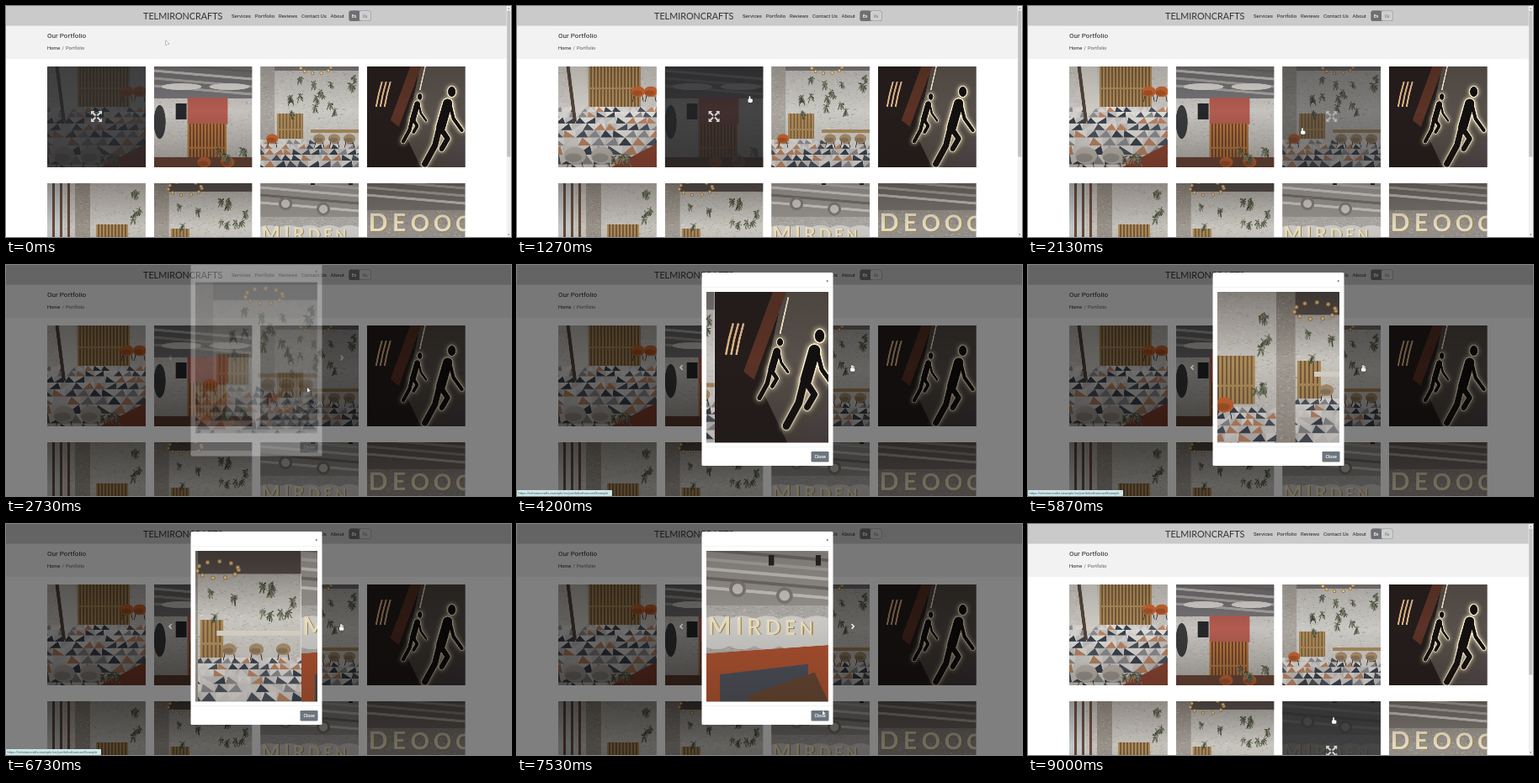
Write an HTML page with a canvas that moves like this. It is 600 by 275 pixels and loops after 9270 ms.

```html
<!DOCTYPE html>
<html lang="en">
<head>
<meta charset="utf-8">
<title>Our Portfolio</title>
<style>
html, body { margin: 0; width: 100%; height: 100%; overflow: hidden; background: #fff; }
canvas { display: block; width: 100vw; height: 100vh; }
</style>
</head>
<body>
<canvas id="stage"></canvas>
<script>
const W = 600, H = 275, LOOP = 9270;
const K = Math.max(1, window.devicePixelRatio || 1);
const PHOTO_W = 117, PHOTO_H = 144;
let g; // context currently drawn on

function surface(canvas, w, h, scale) {
  canvas.width = Math.round(w * scale);
  canvas.height = Math.round(h * scale);
  const c = canvas.getContext('2d');
  c.scale(scale, scale);
  return c;
}

// --- drawing helpers ---
function rect(color, x, y, w, h, r = 0) {
  g.fillStyle = color;
  g.beginPath();
  g.roundRect(x, y, w, h, r);
  g.fill();
}
function trace(pts) {
  g.beginPath();
  for (let i = 0; i < pts.length; i += 2) g.lineTo(pts[i], pts[i + 1]);
}
function poly(color, ...pts) {
  trace(pts);
  g.fillStyle = color;
  g.fill();
}
function line(color, width, ...pts) {
  trace(pts);
  g.strokeStyle = color;
  g.lineWidth = width;
  g.stroke();
}
function oval(color, x, y, rx, ry = rx) {
  g.fillStyle = color;
  g.beginPath();
  g.ellipse(x, y, rx, ry, 0, 0, 7);
  g.fill();
}
function text(str, x, y, size, color = '#222', font = 'Roboto', weight = 400) {
  g.font = `${weight} ${size}px ${font}, sans-serif`;
  g.fillStyle = color;
  g.fillText(str, x, y);
  return g.measureText(str).width;
}
function faded(alpha, draw) {
  if (alpha <= 0) return;
  g.save();
  g.globalAlpha = alpha;
  draw();
  g.restore();
}
function clipped(x, y, w, h, draw) {
  g.save();
  g.beginPath();
  g.rect(x, y, w, h);
  g.clip();
  draw();
  g.restore();
}

// --- things seen in the photographs ---
let seed = 7;
const rnd = (lo = 0, hi = 1) => lo + (hi - lo) * (seed = seed * 16807 % 2147483647) / 2147483647;
const pick = list => list[Math.floor(rnd(0, list.length))];

function wall(color, x = 0, w = PHOTO_W) {
  rect(color, x, 0, w, PHOTO_H);
  for (let i = w * 9; i > 0; i--)
    rect(pick(['#ffffff38', '#0000001c']), x + rnd(0, w - 2), rnd(0, PHOTO_H), 2, .8);
}
function shade(top, bottom) {
  const fill = g.createLinearGradient(0, 0, 0, PHOTO_H);
  fill.addColorStop(0, `rgba(30,24,20,${top})`);
  fill.addColorStop(.45, 'rgba(30,24,20,0)');
  fill.addColorStop(1, `rgba(30,24,20,${bottom})`);
  rect(fill, 0, 0, PHOTO_W, PHOTO_H);
}
function mosaic(top, size) {
  for (let y = top, s = size; y < PHOTO_H; y += s * .6, s *= 1.1)
    for (let x = -rnd(0, s); x < PHOTO_W; x += s) {
      const b = y + s * .6;
      rect(pick(['#dfdcd7', '#cfccc9', '#c3c0bd']), x, y, s, s * .6);
      poly(pick(['#39414d', '#4b525d', '#8b8b8e', '#d5d2cf', '#b98464']), x, b, x + s * rnd(), y, x + s, b);
    }
}
function slats(x, y, w, h, color = '#ab8a58', gap = '#75593a') {
  rect(gap, x, y, w, h);
  for (let i = 0; i < w; i += 4) rect(color, x + i, y, 2.4, h);
  rect(color, x, y + h * .6, w, 2);
}
function plants(count, x, y, w, h) {
  while (count--) {
    const px = x + rnd(0, w), py = y + rnd(0, h);
    for (let i = 0; i < 22; i++)
      line(pick(['#5b6350', '#747a62', '#434a3a', '#8d8f7c']), .9, px, py, px + rnd(-4, 4), py + rnd(-3, 9));
  }
}
function chairs(color, size, x, y, count = 1, step = 0) {
  for (; count--; x += step) {
    for (const side of [-1, 1]) line('#3a2e28', .8, x + side * size * .5, y, x + side * size * .8, y + size * 1.5);
    oval(color, x, y, size, size * .8);
    oval('#0000002a', x - size * .15, y + size * .2, size * .75, size * .4);
  }
}
function lamps(x, y, r) {
  for (let a = 0; a < 6.2; a += .6) {
    const bx = x + r * Math.cos(a), by = y + r * .4 * Math.sin(a);
    oval('#c08a45', bx, by, 2.2);
    oval('#ffedb8', bx, by, 1.3);
  }
}
function ceiling(depth, color) {
  rect(color, 0, 0, PHOTO_W, depth);
  for (let y = -10; y < depth - 12; y += 9)
    line(pick(['#c3bfba', '#6d6964', '#aaa6a1']), 3, 0, y, PHOTO_W, y + 10);
}
function sign(word, x, base, size, shrink) {
  for (const letter of word) {
    text(letter, x + 1, base + .5, size, '#a1843f', 'Lato', 700);
    x += text(letter, x, base, size, '#e6dcc3', 'Lato', 700) + size * .18;
    size *= shrink;
  }
}
// Leaning walker, drawn from its head downwards, lit from behind.
function walker(x, y, s) {
  g.save();
  g.translate(x, y);
  g.scale(s, s);
  g.lineCap = g.lineJoin = 'round';
  g.shadowColor = '#fff0c4';
  for (const [color, grow, blur] of [['#fff4d6', 2.5, 14 * K], ['#120f0f', 0, 0]]) {
    g.shadowBlur = blur;
    oval(color, 0, 0, 4.5 + grow / 2, 6 + grow / 2);
    line(color, 11 + grow, -5, 14, -13, 42);
    line(color, 7 + grow, -15, 44, -20, 64, -32, 86);
    line(color, 6 + grow, -13, 44, -5, 56, -12, 68);
    line(color, 4 + grow, -2, 16, 2, 32, 12, 46);
  }
  g.restore();
}

const ORANGE = '#c4622f', BEIGE = '#a68d6c', BRICK = '#c6c3be', DARK = '#5b5450';
const scenes = [
  () => {
    wall(BRICK);
    slats(36, 0, 62, 62);
    mosaic(60, 10);
    poly('#cfccc6', 14, 0, 32, 0, 36, 58, 20, 74);
    line('#51433a', 4, 10, 0, 20, 78);
    chairs(ORANGE, 8, 95, 42, 2, 15);
    poly('#8a4330', 117, 104, 117, 144, 40, 144);
    chairs('#bcb5ad', 13, 20, 118, 2, 32);
    plants(5, 62, 112, 24, 12);
    shade(.2, .3);
  },
  () => {
    wall(BRICK);
    ceiling(50, '#747376');
    for (const x of [33, 90]) oval('#d9d7d3', x, 36, 24, 4);
    rect('#b25c50', 40, 49, 48, 32);
    slats(40, 80, 46, 46, '#b07a3f', '#6e3426');
    oval('#383a3c', 7, 78, 7, 20);
    rect('#26272a', 26, 56, 13, 19);
    rect('#6b4635', 0, 120, 117, 24);
    chairs(ORANGE, 8, 60, 126, 2, 28);
    plants(6, 76, 108, 36, 14);
    shade(.3, .4);
  },
  () => {
    wall('#cac8c3');
    rect('#7d7a7b', 0, 0, 117, 17);
    wall('#aaa69f', 0, 17);
    mosaic(99, 9);
    slats(20, 68, 31, 30);
    plants(16, 34, 20, 78, 48);
    lamps(66, 13, 18);
    rect('#a5875c', 60, 87, 57, 4);
    chairs(ORANGE, 7, 14, 98);
    chairs(BEIGE, 7, 70, 98, 3, 18);
    shade(.25, .2);
  },
  () => {
    rect('#241d1c', 0, 0, 117, 144);
    poly('#58504b', 66, 0, 117, 0, 117, 144, 70, 144, 46, 94);
    poly('#5a5054', 117, 94, 117, 144, 80, 144);
    poly('#5c3326', 56, 0, 69, 0, 38, 84, 28, 76);
    line('#fff3d0', 1.5, 71, 5, 63, 40);
    for (let x = 14; x < 28; x += 5) line('#e5b988', 2, x + 4, 30, x, 45, x - 3, 60);
    walker(63, 48, .62);
    walker(101, 42, 1);
    shade(.2, .4);
  },
  () => {
    wall('#c4c0ba');
    rect('#c3c8c8', 0, 0, 20, 144);
    for (let x = 6; x < 30; x += 9) rect('#67493a', x, 0, 3, 144);
    wall('#99938a', 33, 18);
    mosaic(110, 9);
    slats(58, 61, 38, 46);
    plants(5, 100, 12, 12, 45);
    plants(4, 96, 84, 12, 10);
    chairs(ORANGE, 9, 67, 108);
    shade(.4, .2);
  },
  () => {
    wall('#c8c5bf');
    rect(DARK, 0, 0, 117, 22);
    mosaic(102, 9);
    slats(20, 66, 22, 36);
    wall('#a19b93', 0, 18);
    plants(12, 26, 30, 84, 32);
    lamps(37, 18, 20);
    rect('#d7d1c6', 36, 76, 81, 5);
    chairs(BEIGE, 7, 48, 94, 3, 26);
    shade(.5, .2);
  },
  () => {
    wall('#aaa7a3');
    ceiling(52, '#928f8b');
    for (const x of [30, 75]) {
      oval('#7b7771', x, 32 + x / 7, 8);
      oval('#c2beb7', x, 32 + x / 7, 5);
      rect('#222', x + 30, 4, 5, 10);
    }
    for (let x = 10; x < 117; x += 24) oval('#cbc9c5', x, 78, 20, 16);
    sign('MIRDEN', 1, 80, 24, .94);
    poly('#a54e2d', 0, 98, 117, 90, 117, 144, 0, 144);
    poly('#484b54', 13, 118, 98, 108, 98, 144, 13, 144);
    poly('#61432f', 40, 138, 104, 116, 117, 144, 40, 144);
    shade(.2, .2);
  },
  () => {
    wall('#96908a');
    ceiling(44, '#77716b');
    sign('DEOOC', 2, 69, 30, .96);
    rect('#494b53', 0, 100, 117, 44);
    shade(.4, .2);
  }
];
const photos = scenes.map(draw => {
  const canvas = document.createElement('canvas');
  g = surface(canvas, PHOTO_W, PHOTO_H, 2.5 * K);
  draw();
  return canvas;
});

// --- timing ---
const mix = (a, b, p) => a + (b - a) * p;
const ramp = (t, from, to) => Math.min(1, Math.max(0, (t - from) / (to - from)));
const pulse = (t, on, off, fade) => ramp(t, on, on + fade) - ramp(t, off, off + fade);
const smooth = p => p * p * (3 - 2 * p);
const easeOut = p => 1 - (1 - p) ** 2;
const slideEase = p => 1 - (1 - p) ** 2.1 * (1 + .1 * p);

const CLICK = 2500, OPEN = 2685, SHUT = 7650;
const slideStarts = [3760, 4600, 5690, 6690];
const hovers = [
  { photo: 0, on: -500, off: 100 },
  { photo: 1, on: 750, off: 1400 },
  { photo: 2, on: 1850, off: 2400 },
  { photo: 6, on: 8350, off: LOOP }
];
const moves = [
  { from: 70, to: 2100, x: 326, y: 145 },
  { from: 2200, to: CLICK, x: 358, y: 146 },
  { from: 2950, to: 3500, x: 398, y: 119 },
  { from: 7050, to: 7480, x: 363, y: 222 },
  { from: 8100, to: 8500, x: 363, y: 230 }
];
function pointer(t) {
  let x = 190, y = 41;
  for (const move of moves) {
    const p = smooth(ramp(t, move.from, move.to));
    x = mix(x, move.x, p);
    y = mix(y, move.y, p);
  }
  return [x, y];
}

// --- page ---
function expandIcon(x, y) {
  for (let i = 0; i < 4; i++) {
    g.save();
    g.translate(x, y);
    g.rotate(i * Math.PI / 2);
    line('#d6d6d6', 2, 1, 1, 5, 5);
    poly('#d6d6d6', 6.5, 6.5, 2, 6.5, 6.5, 2);
    g.restore();
  }
}
function thumb(i, t) {
  const x = 49 + i % 4 * 126.6, y = i < 4 ? 72 : 211;
  const hover = hovers.find(h => h.photo === i);
  clipped(x, y, PHOTO_W, 120, () => {
    g.drawImage(photos[i], x, y - 12, PHOTO_W, PHOTO_H);
    if (hover) faded(pulse(t, hover.on, hover.off, 480), () => {
      rect('rgba(34,34,36,.78)', x, y, PHOTO_W, 120);
      expandIcon(x + 58.5, y + 59.5);
    });
  });
}
function header() {
  rect('#f2f2f2', 0, 23, W, 40);
  rect('#cacaca', 0, 0, W, 23.5);
  text('TELMIRONCRAFTS', 163, 16, 10.8, '#333', 'Lato');
  let x = 268;
  for (const label of ['Services', 'Portfolio', 'Reviews', 'Contact Us', 'About'])
    x += text(label, x, 14.4, 6.1) + 4.7;
  rect('#8a8c8f', 407.5, 5.5, 26, 12.5, 2.5);
  rect('#cfcfcf', 420, 6, 13, 11.5, 2);
  rect('#6c6f73', 407.5, 5.5, 12.5, 12.5, 2.5);
  text('En', 411, 13.5, 4.6, '#fff', 'Roboto', 700);
  text('Ru', 424, 13.5, 4.6, '#777');
  text('Our Portfolio', 49, 37.6, 8.1);
  text('Home', 49, 51.8, 5.7);
  text('/', 66.5, 51.8, 5.7, '#666');
  text('Portfolio', 71, 51.8, 5.8, '#566069');
}
function scrollbar() {
  rect('#f1f1f1', 594.7, 0, 5.3, H);
  rect('#c1c1c1', 595.3, 5.5, 4, 174);
  poly('#777', 596, 3.5, 598.6, 3.5, 597.3, 2);
  poly('#777', 596, 271.5, 598.6, 271.5, 597.3, 273);
}

// --- dialog with sliding photos ---
const layer = document.createElement('canvas');
const layerCtx = surface(layer, W, H, K);

function chevron(x, dir, color) {
  line(color, 1.5, x - dir * 1.4, 119.3, x + dir * 1.3, 122, x - dir * 1.4, 124.7);
}
function dialog(t) {
  rect('#fff', 219.5, 9, 156, 230, 1.5);
  for (const y of [26, 216.5]) rect('#e6e8ea', 220, y, 155, .5);
  text('×', 367.6, 20.5, 4.5, '#555', 'Roboto', 700);
  const shift = slideStarts.reduce((sum, start) => sum + slideEase(ramp(t, start, start + 600)), 0);
  clipped(225, 32, 145, 179.5, () => {
    for (let n = Math.floor(shift); n <= Math.ceil(shift); n++)
      g.drawImage(photos[2 + n], 225 + (n - shift) * 145, 32, 145, 179.5);
  });
  rect('#6c757d', 349.5, 222, 21, 12.5, 1.2);
  text('Close', 353.6, 230.2, 5.2, '#fff', 'Roboto', 500);
  chevron(195.3, -1, '#ffffff90');
  chevron(399, 1, '#fff');
}
function modal(t) {
  const drop = easeOut(ramp(t, OPEN, OPEN + 300)) - easeOut(ramp(t, SHUT, SHUT + 300));
  faded(pulse(t, OPEN, SHUT, 150), () => {
    g = layerCtx;
    g.clearRect(0, 0, W, H);
    dialog(t);
    g = stage;
    g.drawImage(layer, 0, -16 * (1 - drop), W, H);
  });
}
function statusBar() {
  rect('#cfe8e8', 0, 268, 113, 7, 1);
  text('https://telmironcrafts.example/en/portfolio#carouselExample', 1.5, 272.8, 3.9, '#456');
}
function cursor(t) {
  const [x, y] = pointer(t);
  const hand = t > CLICK && t < 8100 ? x > 390 : y > 72;
  g.save();
  g.translate(x, y);
  if (hand) {
    for (const [color, grow] of [['#333', .4], ['#fff', 0]]) {
      rect(color, -.8 - grow, -grow, 1.6 + 2 * grow, 6 + 2 * grow, .8);
      rect(color, -2 - grow, 3.4 - grow, 5.4 + 2 * grow, 4.4 + 2 * grow, 1.4);
    }
  } else {
    const arrow = [0, 0, 0, 5.6, 1.5, 4.4, 3.8, 4];
    line('#555', .7, ...arrow, 0, 0);
    poly('#fff', ...arrow);
  }
  g.restore();
}

const stage = surface(document.getElementById('stage'), W, H, K);
function frame(now) {
  const t = now % LOOP;
  const dim = pulse(t, 2530, 7950, 150);
  g = stage;
  rect('#fff', 0, 0, W, H);
  header();
  photos.forEach((_, i) => thumb(i, t));
  if (dim === 0) scrollbar();
  faded(dim * .5, () => rect('#000', 0, 0, W, H));
  modal(t);
  faded(pulse(t, 3600, 7150, 220), statusBar);
  cursor(t);
  requestAnimationFrame(frame);
}
requestAnimationFrame(frame);
</script>
</body>
</html>
```
